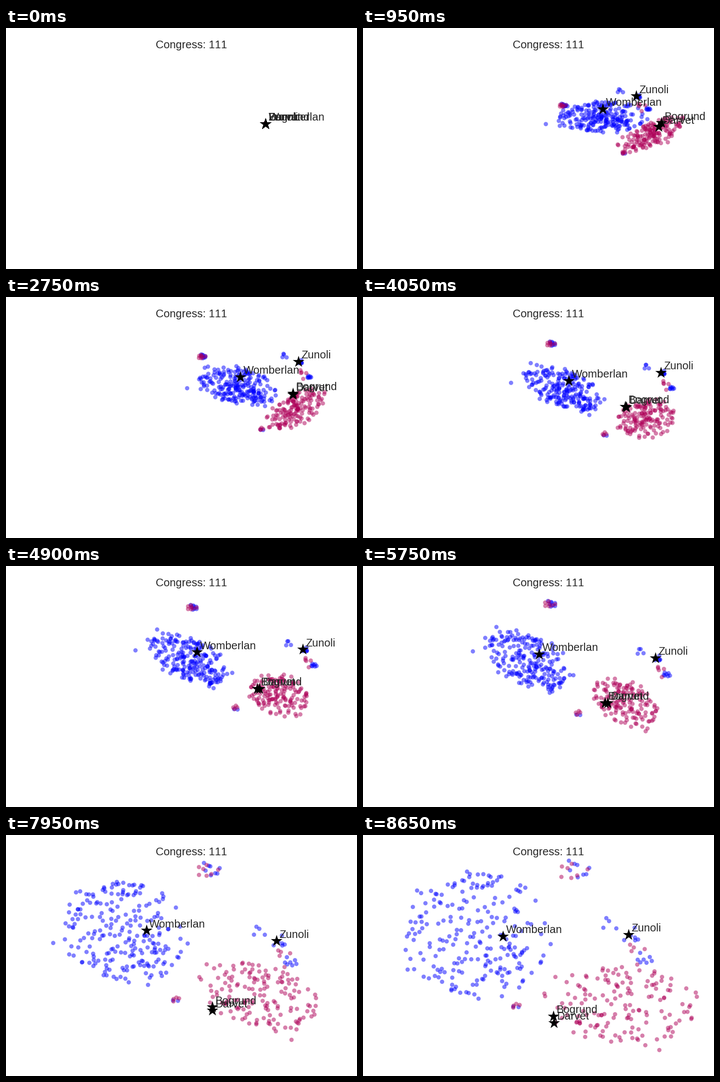
A matplotlib script that plays this animation: 640 px wide and 440 px high, repeating every 8.7 s.

```python
import numpy as np
import matplotlib.pyplot as plt
from matplotlib.animation import FuncAnimation

W, H, DPI = 640, 440, 80
STEP, FRAMES = 50, 174
BLUE, RED, INK = "#0000ff", "#ae0058", "#262626"
ORIGIN = np.array([473.0, 175.0])
TIMES = np.array([1750, 2750, 4050, 5750, 7200, 8650], float)

# star positions at TIMES
STARS = {
    "Zunoli": [(495, 115), (533, 118), (543, 138),
               (533, 168), (504, 199), (484, 182)],
    "Womberlan": [(441, 143), (427, 146), (375, 153),
                  (321, 161), (263, 165), (255, 185)],
    "Bogrund": [(536, 173), (523, 175.5), (478, 200),
                (441, 250), (404, 295), (347, 331)],
    "Darvet": [(532, 181), (523, 178), (480, 201),
               (446, 250), (404, 296), (348, 343)],
}

rng = np.random.default_rng(11)
plt.rcParams["font.family"] = "Liberation Sans"
plt.rcParams["text.kerning_factor"] = 6

star_keys = np.array(list(STARS.values()), float).transpose(1, 0, 2)
star_slopes = np.gradient(star_keys, TIMES, axis=0)


def star_spots(t):
    """Cubic Hermite path through the star positions."""
    t = max(t, TIMES[0])
    k = min(np.searchsorted(TIMES, t, side="right") - 1, len(TIMES) - 2)
    h = TIMES[k + 1] - TIMES[k]
    u = (t - TIMES[k]) / h
    return ((1 + 2 * u) * (1 - u) ** 2 * star_keys[k]
            + u * (1 - u) ** 2 * h * star_slopes[k]
            + u * u * (3 - 2 * u) * star_keys[k + 1]
            + u * u * (u - 1) * h * star_slopes[k + 1])


class Cloud:
    """Random dots in a unit disc with a few strays, each swaying slightly."""

    def __init__(self, n, strays=0.0):
        angle = rng.uniform(0, 2 * np.pi, n)
        self.r = np.sqrt((np.arange(n) + rng.random(n)) / n)
        self.r *= 1 + strays * rng.exponential(1, n)
        self.dots = self.r[:, None] * np.column_stack([np.cos(angle),
                                                       np.sin(angle)])
        self.phase = rng.uniform(0, 2 * np.pi, n)

    def place(self, t, centre, rx, ry, shear=0, dense=0):
        turn = self.phase + t / 1200
        x, y = (self.dots * self.r[:, None] ** dense).T
        x = rx * (x + .08 * np.cos(turn))
        y = ry * (y + .08 * np.sin(turn)) + shear * x
        return np.column_stack([x, y]) + centre


blue_main, red_main = Cloud(222, .06), Cloud(152, .06)
blue_islet, red_islet = Cloud(8), Cloud(7)
blue_tail, red_tail = Cloud(2), Cloud(4)
lead, middle, trail, mixed = Cloud(4), Cloud(6), Cloud(7), Cloud(5)
n_blue = sum(len(c.r) for c in (blue_main, blue_islet, blue_tail,
                                lead, middle, trail))
n_red = sum(len(c.r) for c in (red_main, red_islet, red_tail, mixed))


def dot_spots(t, spots):
    """All dots, blue ones first; u runs from 0 to 1 while the map unfolds."""
    u = np.clip((t - TIMES[0]) / (TIMES[-1] - TIMES[0]), 0, 1)
    flank, hub = spots[0], spots[1]
    dense = .3 * (1 - u)

    blue = (hub + (-4 - 48 * u**2, 18 - 18 * u**2),
            64 + 56 * u**4, 34 + 82 * u**3, .35 * np.sin(np.pi * u), dense)
    red = ((497 + 33 * np.cos(np.pi * (u - .145) / .65), 196 + 114 * u**1.4),
           48 + 80 * u**4, 27 + 15 * u + 30 * u**4,
           -.45 * np.cos(np.pi * u / .7), dense)

    size = .2 + .15 * u + .65 * u**4
    islet = ((376 + 7 * u - 160 * u * (1 - u), 64 + 71 * (1 - u)**3),
             30 * size, 20 * size)
    tail = ((478 - 192 * u**1.6, 238 + 74 * u**1.6), 5 + 9 * u, 6 + 6 * u)

    def beside(dx, dy, spread):
        return (flank + np.array([dx, dy]) * (1 + .5 * u**4),
                *[spread + 13 * u**3] * 2)

    return np.concatenate([
        blue_main.place(t, *blue),
        lead.place(t, *beside(-28, -9, 7)),
        middle.place(t, *beside(4, 1, 4)),
        trail.place(t, *beside(20, 27, 4)),
        blue_islet.place(t, *islet),
        blue_tail.place(t, *tail),
        red_main.place(t, *red),
        mixed.place(t, *beside(6, 25, 10)),
        red_islet.place(t, *islet),
        red_tail.place(t, *tail),
    ])


def ease(t, start, end):
    u = np.clip((t - start) / (end - start), 0, 1)
    return u * u * (3 - 2 * u)


def burst(t):
    """Scale about the origin: a wide, flat burst that settles at 1."""
    flat = np.array([1.16, .8])
    return flat * ease(t, 100, 600) + (1 - flat) * ease(t, 600, TIMES[0])


def layout(t):
    spots = star_spots(t)
    scale = burst(t)
    return (ORIGIN + (dot_spots(t, spots) - ORIGIN) * scale,
            ORIGIN + (spots - ORIGIN) * scale)


fig = plt.figure(figsize=(W / DPI, H / DPI), dpi=DPI, facecolor="white")
ax = fig.add_axes([58 / W, 43 / H, 560 / W, 354 / H])
ax.set_xlim(58, 618)
ax.set_ylim(397, 43)
ax.axis("off")
fig.text(338 / W, 1 - 37 / H, "Congress: 111", size=18, color=INK,
         ha="center", va="baseline")

first_dots, first_stars = layout(0)
dots = ax.scatter(*first_dots.T, s=50, c=[BLUE] * n_blue + [RED] * n_red,
                  alpha=.5, linewidths=0)
stars = ax.scatter(*first_stars.T, s=400, c="black", marker="*",
                   linewidths=0, zorder=2)
labels = [ax.annotate(name, ORIGIN, xytext=(5, 5), textcoords="offset points",
                      size=18, color=INK) for name in STARS]


def draw(i):
    dot_xy, star_xy = layout(i * STEP)
    dots.set_offsets(dot_xy)
    stars.set_offsets(star_xy)
    for label, spot in zip(labels, star_xy):
        label.xy = tuple(spot)
    return [dots, stars, *labels]


anim = FuncAnimation(fig, draw, frames=FRAMES, interval=STEP,
                     repeat=True, repeat_delay=0, blit=False)
plt.show()
```
